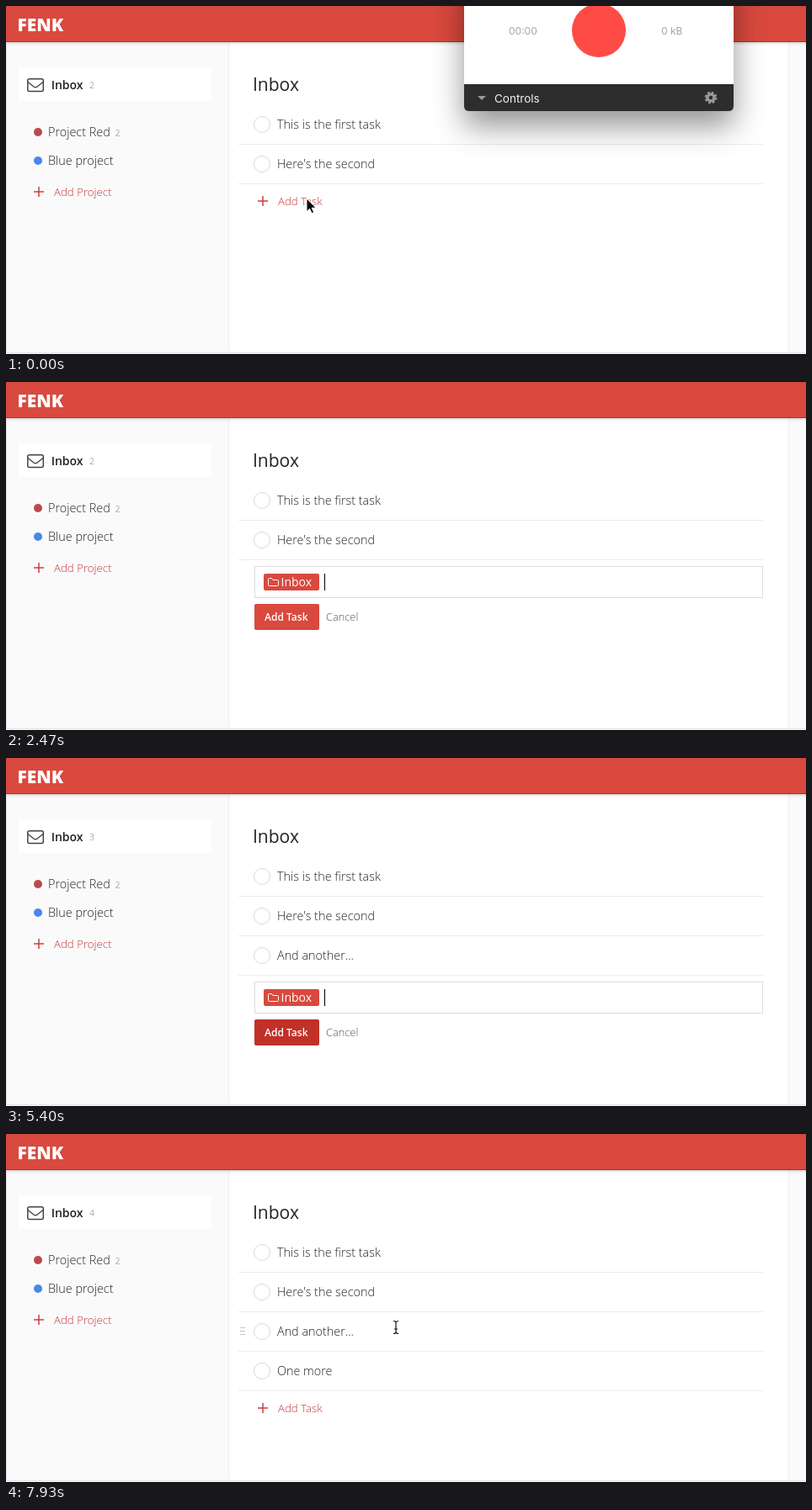
Write an HTML page that moves like this. It is 950 px wide and 414 px high and loops after 8 s.

```html
<!DOCTYPE html>
<html lang="en">
<head>
<meta charset="utf-8">
<title>Task list</title>
<style>
  html, body { margin: 0; width: 100%; height: 100%; overflow: hidden; background: #fafafa; }
  svg { display: block; width: 100%; height: 100%; }
  text { font: 300 14.4px "Open Sans", sans-serif; fill: #222; white-space: pre; }
  .logo { font-weight: 800; font-size: 21px; fill: #fff; }
  .heading { font-weight: 400; font-size: 21px; }
  .active { font-weight: 600; font-size: 14px; }
  .count { font-weight: 400; font-size: 10.5px; fill: #aaa; }
  .link { font-size: 13.25px; fill: #c5373c; }
  .chip { font-weight: 400; font-size: 14px; fill: #fff; }
  .submit { font-weight: 600; font-size: 12px; fill: #fff; }
  .cancel { font-size: 12.8px; fill: #555; }
  .meter { font: 400 12px Inter, sans-serif; fill: #a4a4a4; }
  .controls { font: 400 13.5px Inter, sans-serif; fill: #f2f2f2; }
  .window { filter: drop-shadow(0 18px 18px rgba(0, 0, 0, .42)); }
  .line { fill: none; stroke: #ededed; }
  .plus { fill: none; stroke: #c9423e; stroke-width: 1.5; }
</style>
</head>
<body>
<svg viewBox="0 0 950 414" preserveAspectRatio="none">
  <defs>
    <path id="plus" class="plus" d="M-6 0H6M0 -6V6"/>
    <path id="fingers" d="M-4 4V-3M-1 4V-6M2 4V-6M5 4V-4M-6.5 1L-3 6M-2 8H3.5V4H-2Z"
      stroke-linecap="round" stroke-linejoin="round"/>
    <path id="beam" d="M-3 -7.5Q0 -7.5 0 -5.5Q0 -7.5 3 -7.5M0 -5.5V5.5M-3 7.5Q0 7.5 0 5.5Q0 7.5 3 7.5M-2 2H2" fill="none"/>
    <linearGradient id="headerShadow" x2="0" y2="1">
      <stop stop-color="#000" stop-opacity=".13"/>
      <stop offset="1" stop-color="#000" stop-opacity="0"/>
    </linearGradient>
  </defs>

  <rect width="950" height="414" fill="#fafafa"/>
  <rect x="264.5" y="40" width="665" height="372" fill="#fff" stroke="#eee"/>
  <rect y="43" width="950" height="4" fill="url(#headerShadow)"/>
  <rect width="950" height="43" fill="#d9493e"/>
  <path d="M0 .5H950" stroke="#cf4a40"/>
  <path d="M0 42.5H950" stroke="#a93228"/>
  <path d="M.5 43V412.5H950" fill="none" stroke="#e4e4e4"/>
  <text class="logo" x="13.5" y="30">FENK</text>

  <rect x="15" y="73" width="229" height="40" fill="#fff"/>
  <g fill="none" stroke="#444" stroke-width="1.5">
    <rect x="25.8" y="86.8" width="18.5" height="14.8" rx="2"/>
    <path d="M26 90.5L33 96Q35 97.5 37 96L44 90.5"/>
  </g>
  <text class="active" x="53.7" y="99">Inbox</text>
  <text class="count" id="total" x="99" y="98"></text>
  <circle cx="38" cy="150" r="5" fill="#b94a48"/>
  <text x="50" y="155">Project Red</text>
  <text class="count" x="129.5" y="155">2</text>
  <circle cx="38" cy="184" r="5" fill="#4a86e8"/>
  <text x="50" y="189">Blue project</text>
  <use href="#plus" x="39" y="221"/>
  <text class="link" x="57" y="226">Add Project</text>

  <text class="heading" x="293" y="101">Inbox</text>
  <g id="tasks"></g>

  <g id="addLink">
    <use href="#plus" x="305" y="21"/>
    <text class="link" x="323" y="26">Add Task</text>
  </g>

  <g id="form">
    <rect x="295.5" y="8.5" width="603" height="37" fill="#fff" stroke="#ddd"/>
    <rect x="306" y="17" width="66" height="20" rx="2" fill="#d9493e"/>
    <path d="M311.5 30.5V23.5Q311.5 22.5 312.5 22.5H315.5L317 24.5H322.5Q323.5 24.5 323.5 25.5V30.5Q323.5 31.5 322.5 31.5H312.5Q311.5 31.5 311.5 30.5Z" fill="none" stroke="#fff"/>
    <text class="chip" x="326.5" y="32">Inbox</text>
    <text id="draft" x="377.5" y="32"></text>
    <path id="caret" d="M0 17V37" stroke="#000"/>
    <rect id="submit" x="295" y="53" width="77" height="31" rx="2"/>
    <text class="submit" x="307" y="73">Add Task</text>
    <text class="cancel" x="380" y="73">Cancel</text>
  </g>

  <g id="recorder" class="window">
    <path d="M544 -40H864V119Q864 125 858 125H550Q544 125 544 119Z" fill="#fff"/>
    <path d="M544 93H864V119Q864 125 858 125H550Q544 125 544 119Z" fill="#2d2d2d"/>
    <circle cx="704" cy="29" r="32" fill="#ff4b46"/>
    <text class="meter" x="597" y="34">00:00</text>
    <text class="meter" x="778" y="34">0 kB</text>
    <path d="M560 107H570L565 112Z" fill="#999"/>
    <text class="controls" x="580" y="115">Controls</text>
    <g fill="none" stroke="#999">
      <circle cx="837" cy="109" r="4" stroke-width="3.4"/>
      <circle cx="837" cy="109" r="6.2" stroke-width="2.4" stroke-dasharray="2.6 2.27"/>
    </g>
  </g>

  <g id="cursor">
    <path id="arrow" d="M0 0V15.5L3.6 12.2L6.1 17.6L8.6 16.5L6.2 11.2H11Z" fill="#000" stroke="#fff"/>
    <g id="hand">
      <use href="#fingers" fill="#000" stroke="#000" stroke-width="4.4"/>
      <use href="#fingers" fill="#fff" stroke="#fff" stroke-width="2.1"/>
    </g>
    <g id="ibeam">
      <use href="#beam" stroke="#fff" stroke-width="2.6"/>
      <use href="#beam" stroke="#111" stroke-width="1.2"/>
    </g>
  </g>
</svg>
<script>
  const LOOP = 8000, FIRST_ROW = 117, ROW = 47;
  const OPEN = 2220, ADD_FIRST = 4980, ADD_LAST = 6960, CURSOR_BACK = 7220;
  const titles = ["This is the first task", "Here's the second", "And another...", "One more"];
  const drafts = [
    { text: "And another...", start: 2940, step: 92, end: ADD_FIRST },
    { text: " One more", start: 5720, step: 85, end: ADD_LAST },
  ];
  // Pointer positions: time, x, y
  const path = [
    [0, 357, 229], [150, 357, 229], [450, 353, 235], [1250, 353, 235],
    [1730, 351, 268], [2100, 349, 314], [CURSOR_BACK, 349, 317],
    [7480, 400, 290], [7800, 464, 232], [7930, 463, 230],
  ];

  const el = id => document.getElementById(id);
  const clamp = v => Math.max(0, Math.min(1, v));
  const ease = v => v * v * (3 - 2 * v);
  const show = (node, on) => node.setAttribute("display", on ? "inline" : "none");
  const move = (node, x, y) => node.setAttribute("transform", `translate(${x} ${y})`);

  el("tasks").innerHTML = titles.map((title, i) => `
    <g transform="translate(0 ${FIRST_ROW + i * ROW})">
      <path class="handle" d="M278 19.5H284M278 23.5H284M278 27.5H284" stroke="#c4c4c4"/>
      <circle cx="304" cy="24" r="9.5" fill="#fff" stroke="#d9d9d9"/>
      <text x="322" y="29">${title}</text>
      <path class="line" d="M276 47.5H899"/>
    </g>`).join("");
  const rows = [...el("tasks").children];

  function pointerAt(t) {
    const next = path.findIndex(p => p[0] > t);
    if (next < 0) return path[path.length - 1].slice(1);
    const [t0, x0, y0] = path[next - 1], [t1, x1, y1] = path[next];
    const k = ease((t - t0) / (t1 - t0));
    return [x0 + (x1 - x0) * k, y0 + (y1 - y0) * k];
  }

  function drawForm(t, count) {
    const draft = drafts.find(d => t < d.end) || drafts[1];
    const typed = Math.max(0, Math.min(draft.text.length, Math.floor((t - draft.start) / draft.step) + 1));
    const lastEdit = typed ? draft.start + (typed - 1) * draft.step
      : draft === drafts[0] ? OPEN : ADD_FIRST;
    el("draft").textContent = draft.text.slice(0, typed);
    const width = typed ? el("draft").getComputedTextLength() : 0;
    move(el("caret"), Math.round(378 + width) + .5, 0);
    show(el("caret"), (t - lastEdit) % 1000 < 500);
    el("submit").setAttribute("fill", count === 3 ? "#c03128" : "#d9493e");
  }

  function drawCursor(t, listEnd, editing) {
    const [x, y] = pointerAt(t);
    const visible = t < OPEN || t >= CURSOR_BACK;
    const overLink = !editing && t > 190 && y > listEnd + 8 && y < listEnd + 34 && x < 378;
    const overTask = t >= CURSOR_BACK && y < listEnd;
    show(el("cursor"), visible);
    show(el("hand"), overLink);
    show(el("ibeam"), overTask);
    show(el("arrow"), !overLink && !overTask);
    move(el("cursor"), x, y);
    const hovered = overTask ? Math.floor((y - FIRST_ROW) / ROW) : -1;
    rows.forEach((row, i) => show(row.querySelector(".handle"), i === hovered));
  }

  function draw(t) {
    const count = 2 + (t >= ADD_FIRST) + (t >= ADD_LAST);
    const listEnd = FIRST_ROW + count * ROW;
    const editing = t >= OPEN && t < ADD_LAST;

    rows.forEach((row, i) => show(row, i < count));
    el("total").textContent = count;
    show(el("addLink"), !editing);
    show(el("form"), editing);
    move(el("addLink"), 0, listEnd);
    move(el("form"), 0, listEnd);
    if (editing) drawForm(t, count);

    const fade = 1 - clamp((t - 70) / 230);
    show(el("recorder"), fade > 0);
    el("recorder").setAttribute("opacity", fade);
    drawCursor(t, listEnd, editing);
  }

  const begin = performance.now();
  function tick() {
    draw((performance.now() - begin) % LOOP);
    requestAnimationFrame(tick);
  }
  draw(0);
  requestAnimationFrame(tick);
</script>
</body>
</html>
```
